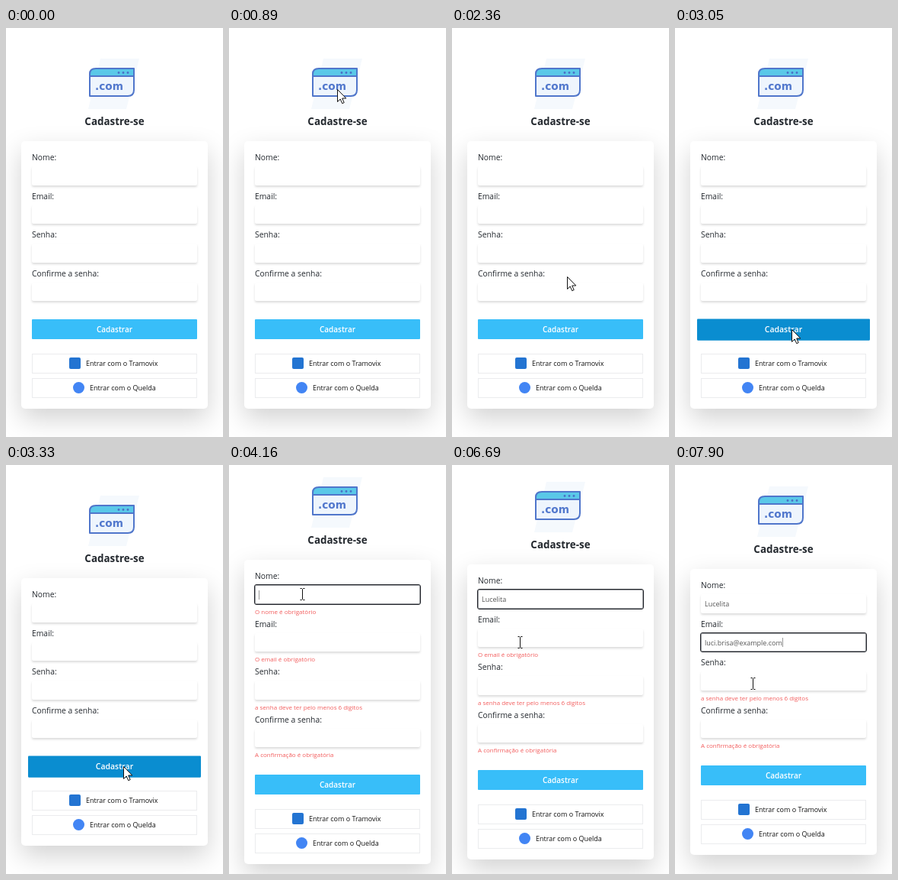
Animation of 285 by 535 pixels, one loop 8 s. Source, as an HTML page:

```html
<!DOCTYPE html>
<html lang="pt-BR">
<head>
<meta charset="utf-8">
<title>Cadastre-se</title>
<style>
  * { box-sizing: border-box; }
  html, body { margin: 0; width: 100%; height: 100%; overflow: hidden; background: #fff; }
  body {
    display: flex; flex-direction: column; justify-content: center; position: relative;
    font: 10.35px "Open Sans", "Noto Sans", sans-serif; color: #24292f;
  }
  body > * { flex: none; }
  .logo { display: block; width: 285px; height: 75px; }
  h1 { margin: 0 0 16px; font-size: 13.4px; line-height: 20px; text-align: center; }
  .card {
    width: 245px; margin-left: 20px; padding: 12px 14px 14px; border-radius: 5px;
    background: #fff; box-shadow: 0 13px 34px rgba(0, 0, 0, .18);
  }
  .field { padding-bottom: 5px; }
  .label { line-height: 18px; margin-bottom: 3px; }
  .input {
    height: 24.6px; padding-left: 5px; border-radius: 2px; background: #fff;
    font-size: 9px; line-height: 25.6px; color: #555; white-space: pre;
    box-shadow: 0 2px 3px rgba(0, 0, 0, .14);
  }
  .input.focus { outline: 1px solid #22252b; box-shadow: inset 0 0 0 1px #9a9ca0; }
  .caret { display: inline-block; width: 1px; height: 12px; background: #999; vertical-align: -2.5px; }
  .error { height: 12px; font-size: 8px; line-height: 10px; color: #f25c5c; white-space: nowrap; }
  .submit {
    height: 26.6px; margin-top: 18.4px; border-radius: 1px; color: #fff;
    font-weight: 600; font-size: 10px; line-height: 26.6px; text-align: center;
  }
  .social {
    position: relative; height: 26px; margin-top: 6px; border: 1px solid #ebecee;
    font-size: 9px; line-height: 24px; color: #111;
  }
  .submit + .social { margin-top: 18.6px; }
  .social i { position: absolute; top: 4.5px; width: 15px; height: 15px; }
  .social span { position: absolute; white-space: nowrap; }
  #pointer { position: absolute; left: 0; top: 0; width: 1px; height: 1px; overflow: visible; }
</style>
</head>
<body>
<svg class="logo" viewBox="0 37 285 75">
  <path d="M124 40H175L158 106H108Z" fill="#f5f9fd"/>
  <path d="M110 89V60Q110 53 118 53H168V81Q168 89 160 89H110Z" fill="#eef5fd"/>
  <path d="M110 63V60Q110 53 118 53H168V63Z" fill="#5ac8e8"/>
  <path d="M110 63H168M110 89V60Q110 53 118 53H168V81Q168 89 160 89Z"
        fill="none" stroke="#5076cb" stroke-width="2" stroke-linejoin="round"/>
  <g fill="#4a70c6"><circle cx="148" cy="58.500" r="1.400"/><circle cx="154" cy="58.500" r="1.400"/><circle cx="160" cy="58.500" r="1.400"/></g>
  <text x="117" y="81" font-family="DejaVu Sans, sans-serif" font-size="13.700" font-weight="700" fill="#5278cd">.com</text>
</svg>
<h1>Cadastre-se</h1>
<div class="card">
  <div id="fields"></div>
  <div class="submit">Cadastrar</div>
  <div class="social"><i style="left:48px;background:#2374d2;border-radius:2px"></i><span style="left:70px">Entrar com o Tramovix</span></div>
  <div class="social"><i style="left:53px;background:#4285f4;border-radius:50%"></i><span style="left:75px">Entrar com o Quelda</span></div>
</div>
<svg id="pointer">
  <path id="arrow" d="M.5 .5V16.500L4.200 13L6.700 18.700L9.200 17.600L6.700 12H11.800Z" fill="#fff" stroke="#111" stroke-linejoin="round"/>
  <path id="beam" d="M-2.500 -7.500H-.5L.5 -6.500L1.500 -7.500H3.500M.5 -6.500V6.500M-2.500 7.500H-.5L.5 6.500L1.500 7.500H3.500" fill="none" stroke="#111"/>
</svg>
<script>
const LOOP = 8000, CLICK = 3400, FOCUS_NAME = 3960, FOCUS_EMAIL = 6890, EMAIL_FILLED = 7490;
const NAME = 'Lucelita', EMAIL = 'luci.brisa@example.com';
const keyTimes = [4570, 5030, 5130, 5230, 5330, 5630, 5760, 5890];

const fields = [
  { label: 'Nome:', error: 'O nome é obrigatório', fixedAt: keyTimes[0] },
  { label: 'Email:', error: 'O email é obrigatório', fixedAt: EMAIL_FILLED },
  { label: 'Senha:', error: 'a senha deve ter pelo menos 6 digitos', fixedAt: Infinity },
  { label: 'Confirme a senha:', error: 'A confirmação é obrigatória', fixedAt: Infinity },
];

// Pointer path: time, x, y
const path = [
  [260, 276, 414], [600, 212, 262], [890, 142, 80], [1030, 110, 54], [1250, 128, 112],
  [1420, 154, 124], [1590, 143, 99], [1870, 136, 54], [2080, 142, 130], [2360, 151, 325],
  [2560, 152, 372], [2710, 152, 391], [3050, 153, 394], [3540, 154, 394], [3750, 124, 254],
  [3820, 111, 206], [3960, 96, 169], [5030, 96, 169], [5430, 102, 176], [6300, 102, 176],
  [6690, 89, 232], [7690, 89, 232], [7900, 102, 286],
];

const $ = selector => document.querySelector(selector);
const clamp = v => Math.min(1, Math.max(0, v));
const ease = v => (v = clamp(v), v * v * (3 - 2 * v));
const mix = (a, b, k) => a + (b - a) * k;
const show = (el, on) => el.style.display = on ? '' : 'none';

for (const field of fields) {
  const box = document.createElement('div');
  box.className = 'field';
  box.innerHTML = `<div class="label">${field.label}</div>
    <div class="input"><span></span><b class="caret"></b></div>`;
  const error = document.createElement('div');
  error.className = 'error';
  error.textContent = field.error;
  $('#fields').append(box, error);
  Object.assign(field, {
    input: box.querySelector('.input'), text: box.querySelector('span'),
    caret: box.querySelector('.caret'), errorBox: error,
  });
}

// The pointer moves in 70 ms steps up to the first focus
function pointerAt(t) {
  if (t < 4000) {
    const base = t < 3000 ? 260 : 3610;
    t = base + Math.floor((t - base) / 70) * 70;
  }
  const next = path.findIndex(p => p[0] > t);
  if (next < 0) return path[path.length - 1].slice(1);
  if (next === 0) return path[0].slice(1);
  const [t0, x0, y0] = path[next - 1], [t1, x1, y1] = path[next];
  const k = (t - t0) / (t1 - t0);
  return [mix(x0, x1, k), mix(y0, y1, k)];
}

function drawField(field, t, text, focused, caretOn) {
  field.text.textContent = text;
  field.input.classList.toggle('focus', focused);
  show(field.caret, focused && caretOn);
  show(field.errorBox, t >= CLICK && t < field.fixedAt);
}

function render(t) {
  const [name, email, ...rest] = fields;
  const typed = keyTimes.filter(k => k <= t).length;
  drawField(name, t, NAME.slice(0, typed), t >= FOCUS_NAME && t < FOCUS_EMAIL, t >= 4160 && t < 6350);
  drawField(email, t, t >= EMAIL_FILLED ? EMAIL : '', t >= FOCUS_EMAIL, t >= 7290);
  rest.forEach(field => drawField(field, t, '', false, false));

  const hover = ease((t - 2620) / 250) - ease((t - CLICK) / 200);
  const color = [[56, 190, 249], [10, 141, 208]];
  const submit = $('.submit');
  submit.style.background = `rgb(${color[0].map((c, i) => Math.round(mix(c, color[1][i], hover)))})`;
  submit.style.transform = hover ? `scale(${1 + .046 * hover})` : '';

  const [x, y] = pointerAt(t);
  const overInput = fields.some(({ input }) => {
    const r = input.getBoundingClientRect();
    return x > r.left && x < r.right && y > r.top && y < r.bottom;
  });
  show($('#pointer'), t >= 260);
  $('#pointer').style.transform = `translate(${Math.round(x)}px, ${Math.round(y)}px)`;
  show($('#arrow'), !overInput);
  show($('#beam'), overInput);
}

function tick() {
  render(performance.now() % LOOP);
  requestAnimationFrame(tick);
}
tick();
</script>
</body>
</html>
```
